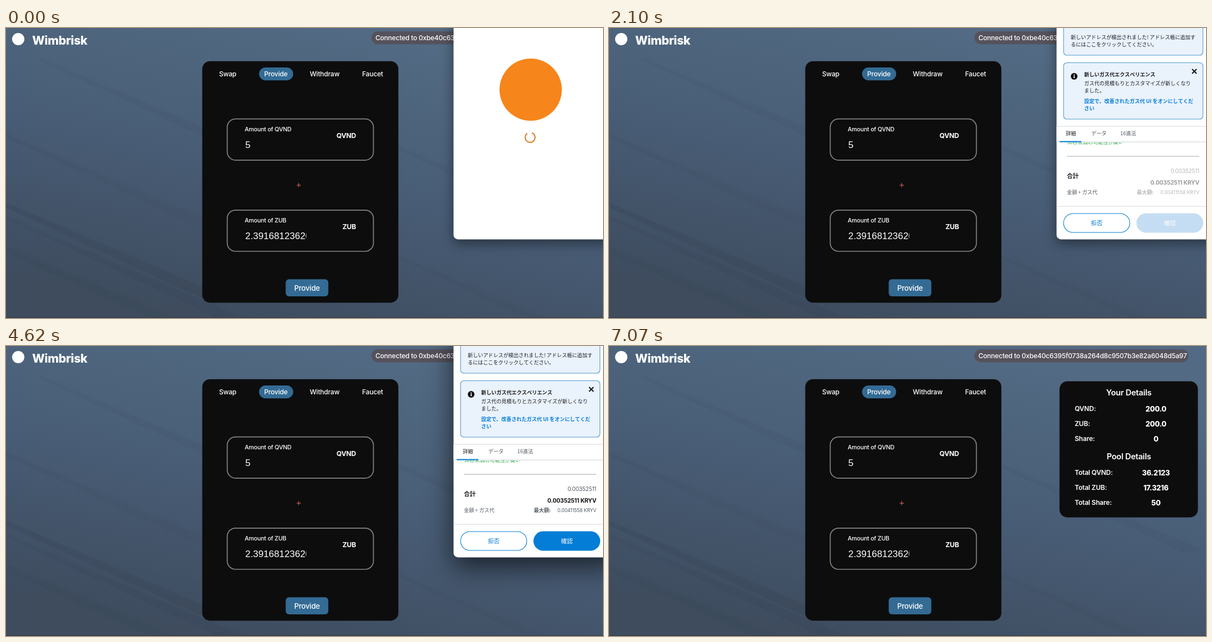
These frames come from a looping animation (1073x522 px, 8 s). An HTML page with a canvas:

```html
<!DOCTYPE html>
<html lang="ja">
<head>
<meta charset="utf-8">
<title>Provide</title>
<style>
html, body { margin: 0; width: 100%; height: 100%; overflow: hidden; background: #485c75; }
canvas { position: absolute; left: 0; top: 0; }
</style>
</head>
<body>
<canvas id="page" width="1073" height="522"></canvas>
<canvas id="popup" width="1073" height="522"></canvas>
<script>
const W = 1073, H = 522, LOOP = 8000;
const SANS = 'Inter, sans-serif';
const CJK = '"Noto Sans CJK JP", "Noto Sans CJK", sans-serif';
const ARIAL = '"Liberation Sans", Arial, sans-serif';
const BLUE = '#037dd6', GREY = '#535a61', LINE = '#d6d9dc', INK = '#1b1d1f';
const TOKEN_A = 'QVND', TOKEN_B = 'ZUB', COIN = 'KRYV';
const popup = document.getElementById('popup');
let g = document.getElementById('page').getContext('2d');

const clamp = (v, a = 0, b = 1) => Math.min(b, Math.max(a, v));
const ramp = (t, from, to) => clamp((t - from) / (to - from));
const smooth = p => p * p * (3 - 2 * p);

// y is the optical centre of the capitals
function text(str, x, y, size, { color = '#fff', weight = 400, align = 'left', font = SANS, alpha = 1 } = {}) {
  g.font = `${weight} ${size}px ${font}`;
  g.letterSpacing = font === SANS ? `${-size * 0.018}px` : '0px';
  g.textAlign = align;
  g.fillStyle = color;
  g.globalAlpha = alpha;
  g.fillText(str, x, y + size * (font === CJK ? 0.38 : 0.36));
  g.globalAlpha = 1;
}
const label = (str, x, y, size, opts = {}) => text(str, x, y, size, { weight: 500, ...opts });
const jp = (str, x, y, size, opts = {}) => text(str, x, y, size, { color: INK, ...opts, font: CJK });

function box(x, y, w, h, r, fill, stroke, lw = 1) {
  g.beginPath();
  g.roundRect(x, y, w, h, r);
  if (fill) { g.fillStyle = fill; g.fill(); }
  if (stroke) { g.strokeStyle = stroke; g.lineWidth = lw; g.stroke(); }
}
function rect(x, y, w, h, color) {
  g.fillStyle = color;
  g.fillRect(x, y, w, h);
}
function line(x1, y1, x2, y2, color, lw) {
  g.beginPath();
  g.moveTo(x1, y1);
  g.lineTo(x2, y2);
  g.strokeStyle = color;
  g.lineWidth = lw;
  g.stroke();
}
function disc(x, y, r, color) {
  g.beginPath();
  g.arc(x, y, r, 0, Math.PI * 2);
  g.fillStyle = color;
  g.fill();
}
function info(x, y, r, color) {
  disc(x, y, r, color);
  rect(x - r * 0.15, y - r * 0.1, r * 0.32, r * 0.62, '#fff');
  rect(x - r * 0.15, y - r * 0.55, r * 0.32, r * 0.3, '#fff');
}

// ---- page behind the popup ----
function streak(x, y, len, thick, alpha) {
  const drop = len * 0.43;
  g.beginPath();
  g.moveTo(x, y);
  g.lineTo(x + len, y + drop);
  g.lineTo(x + len * 0.9, y + drop + thick * 0.4);
  g.lineTo(x, y + thick);
  g.fillStyle = `rgba(38,48,62,${alpha})`;
  g.fill();
}
function backdrop() {
  const sky = g.createLinearGradient(590, 0, 470, 545);
  sky.addColorStop(0, '#526a83');
  sky.addColorStop(0.5, '#485c75');
  sky.addColorStop(1, '#3e4c5e');
  rect(0, 0, W, H, sky);
  streak(0, 314, 400, 9, 0.13);
  streak(0, 338, 420, 6, 0.08);
  streak(0, 392, 300, 14, 0.06);
  streak(60, 52, 330, 7, 0.05);
  streak(0, 190, 380, 8, 0.05);
  streak(690, 205, 380, 8, 0.05);
  streak(690, 402, 280, 7, 0.06);
  rect(0, H - 1, W, 1, 'rgba(25,30,40,.5)');
}
function amount(y, token, value) {
  box(397.6, y, 262.8, 74.2, 15, null, '#858585', 1.7);
  label('Amount of ' + token, 429, y + 18.2, 10.6);
  text(token, 629, y + 30, 12.1, { weight: 700, align: 'right' });
  g.save();
  g.beginPath();
  g.rect(425, y, 114.5, 74);
  g.clip();
  text(value, 430, y + 46.3, 16.9, { font: ARIAL });
  g.restore();
}
function details() {
  box(809.7, 63.6, 248.7, 244.8, 14, '#0d0d0e');
  const title = (s, y) => text(s, 934.3, y, 14.6, { weight: 600, align: 'center' });
  const row = (name, value, y) => {
    text(name, 837, y, 12, { weight: 600 });
    text(value, 983, y, 12.9, { weight: 800, align: 'center' });
  };
  title('Your Details', 83.5);
  row(TOKEN_A + ':', '200.0', 113);
  row(TOKEN_B + ':', '200.0', 140);
  row('Share:', '0', 167);
  title('Pool Details', 198.5);
  row(`Total ${TOKEN_A}:`, '36.2123', 228);
  row(`Total ${TOKEN_B}:`, '17.3216', 255);
  row('Total Share:', '50', 282);
}
function drawPage() {
  backdrop();
  disc(22, 20, 11, '#fff');
  text('Wimbrisk', 47, 22, 21.4, { weight: 800 });
  box(656.7, 6, 384.6, 23.2, 11.6, '#55525c');
  label('Connected to 0xbe40c6395f0738a264d8c9507b3e82a6048d5a97', 664, 17.5, 12);

  box(352.7, 59.7, 352.5, 434.7, 14, '#0d0d0e');
  box(454.8, 71, 61.4, 23.2, 11.6, '#336b94');
  label('Swap', 383, 83, 12);
  label('Provide', 464, 83, 12);
  label('Withdraw', 546, 83, 12);
  label('Faucet', 640, 83, 12);
  amount(163.7, TOKEN_A, '5');
  line(522.5, 283, 530, 283, '#c46652', 1.2);
  line(526, 279, 526, 286.5, '#c46652', 1.2);
  amount(327.8, TOKEN_B, '2.39168123620');
  box(502.7, 452.3, 76.6, 30.8, 6, '#336b94');
  label('Provide', 541, 468, 13.2, { align: 'center' });
  details();
}

// ---- wallet popup ----
function loading() {
  disc(943, 111, 56, '#f6851b');
  g.beginPath();
  g.arc(942, 197, 8.9, -1.2, 4.1);
  g.strokeStyle = '#d9822b';
  g.lineWidth = 2.2;
  g.stroke();
}
function banners() {
  box(817, -12, 250.5, 61, 6, '#eaf2fc', '#4c9bd0', 1.1);
  jp('新しいアドレスが検出されました! アドレス帳に追加す', 830, 16.5, 9.15);
  jp('るにはここをクリックしてください。', 830, 30, 9.15);
  box(817, 62.5, 250.5, 101.5, 6, '#eaf2fc', '#4c9bd0', 1.1);
  info(836, 87, 6, '#101214');
  line(1048, 74, 1056, 82, '#101214', 2);
  line(1056, 74, 1048, 82, '#101214', 2);
  jp('新しいガス代エクスペリエンス', 854, 83.5, 9.15, { weight: 700 });
  jp('ガス代の見積もりとカスタマイズが新しくなり', 854, 100, 9.15);
  jp('ました。', 854, 112.5, 9.15);
  const link = { weight: 700, color: BLUE };
  jp('設定で、改善されたガス代 UI をオンにしてくだ', 854, 131.5, 9.15, link);
  jp('さい', 854, 144.5, 9.15, link);
}
function avatar(x, y) {
  const slice = (a, b, color) => {
    g.beginPath();
    g.moveTo(x, y);
    g.arc(x, y, 14, a * Math.PI, b * Math.PI);
    g.fillStyle = color;
    g.fill();
  };
  disc(x, y, 14, '#f78c0a');
  slice(0.82, 1.02, '#0b7b8d');
  slice(1.02, 1.5, '#f2ab1c');
  slice(1.5, 1.86, '#0b7b8d');
}
function origin(dy) {
  rect(804, 177 + dy, 269, 103, '#f2f4f6');
  text('https://brindlewo-qtm-viewer.zu.example', 823, 197 + dy, 10.5, { color: INK });
  box(823, 215 + dy, 225, 19, 3, null, '#bbc0c5', 1);
  text('0x627...3BcD', 829, 224.5 + dy, 10, { color: BLUE });
  text(':', 892, 224.5 + dy, 10, { color: GREY });
  jp('コントラクトインタラクション', 898, 224.5 + dy, 9.15, { color: GREY });
  info(1034, 224.5 + dy, 4.7, '#6a737d');
  avatar(836.5, 254 + dy);
}
function tabs(y) {
  rect(804, y, 269, 29, '#fff');
  rect(804, y + 27.5, 269, 1.2, LINE);
  rect(810, y + 26.5, 39, 2, BLUE);
  jp('詳細', 821, y + 13, 9.15, { weight: 500 });
  jp('データ', 867, y + 13, 9.15, { color: GREY });
  jp('16進法', 919, y + 13, 9.15, { color: GREY });
}
function confirmFill(t) {
  if (t < 3850 || t >= 6230) return '#c5ddf2';
  if (t >= 5880) return '#0260a4';
  return t >= 4410 && t < 4620 ? '#1787da' : BLUE;
}
function fees(dy, t) {
  const wave = Math.sin(Math.PI * ramp(t, 1540, 3780)) ** 2;
  const alpha = t < 350 ? 0 : 1 - Math.min(0.95, 1.15 * wave);
  const soft = { color: GREY, align: 'right', alpha };
  const bold = { color: '#101214', weight: 700, align: 'right', alpha };

  jp('編集', 1061, 332 + dy, 9.15, { color: BLUE, weight: 500, align: 'right' });
  jp('ガス代見積もり', 823, 366 + dy, 10.6, { weight: 700 });
  info(905.5, 366 + dy, 4.7, '#6a737d');
  text('0.00352511', 1061, 358 + dy, 10, soft);
  text('0.003525 ' + COIN, 1061, 379 + dy, 10.4, bold);

  const y = 190 + dy;
  jp('30秒未満の可能性が高い', 823, 206 + y, 9.15, { color: '#28a745' });
  rect(823, 230.3 + y, 238, 1.4, '#bbc0c5');
  jp('合計', 823, 266 + y, 10.6, { weight: 700 });
  text('0.00352511', 1061, 257 + y, 10, soft);
  text('0.00352511 ' + COIN, 1061, 278 + y, 10.4, bold);
  jp('金額 + ガス代', 823, 295.5 + y, 9.15, { color: GREY });
  jp('最大額:', 979, 295.5 + y, 9.15, { ...bold, color: GREY });
  text('0.00411558 ' + COIN, 1061, 295.5 + y, 8.7, soft);

  rect(804, 320.5 + y, 269, 1, LINE);
  box(817, 334 + y, 119, 34, 17, '#fff', BLUE, 1.1);
  jp('拒否', 876.5, 350.5 + y, 10.6, { color: BLUE, align: 'center' });
  box(948, 333.5 + y, 120, 35, 17.5, confirmFill(t));
  jp('確認', 1008, 350.5 + y, 10.6, { color: '#fff', weight: 500, align: 'center' });
}
function spinner(t) {
  const head = 6 + Math.floor((Math.min(t, 6720) - 6720) / 70);
  for (let i = 0; i < 12; i++) {
    const age = ((head - i) % 12 + 12) % 12;
    const a = i * Math.PI / 6, c = Math.sin(a), s = -Math.cos(a);
    const color = age > 7 ? `rgba(215,212,207,${1.1 - age * 0.05})`
                          : `rgba(228,130,35,${1 - age * 0.1})`;
    line(942.5 + c * 10, 153.5 + s * 10, 942.5 + c * 23, 153.5 + s * 23, color, 4);
  }
}
function windowShape() {
  g.beginPath();
  g.roundRect(804.4, -30, 300, 410.4, 8);
}
function drawPopup(t) {
  g.clearRect(0, 0, W, H);
  if (t >= 7070) return;
  popup.style.opacity = t >= 7000 ? 0.5 : 1;

  const focused = t >= 4270;
  g.save();
  g.shadowColor = focused ? 'rgba(0,0,0,.65)' : 'rgba(0,0,0,.45)';
  g.shadowBlur = focused ? 48 : 22;
  g.shadowOffsetY = focused ? 16 : 7;
  windowShape();
  g.fillStyle = '#fff';
  g.fill();
  g.restore();

  g.save();
  windowShape();
  g.clip();
  if (t < 70) {
    loading();
  } else {
    const scroll = 190 * smooth(ramp(t, 1540, 2080));
    banners();
    g.save();
    g.beginPath();
    g.rect(804, 177, 269, 204);
    g.clip();
    origin(-scroll);
    fees(-scroll, t);
    tabs(Math.max(177, 280 - scroll));
    g.restore();
    rect(804, 176.5, 269, 1, LINE);

    const fresh = 0.8 * (1 - ramp(t, 70, 210));
    if (fresh > 0) rect(804, 0, 269, 381, `rgba(255,255,255,${fresh})`);
    const veil = 0.75 * ramp(t, 6160, 6440);
    if (veil > 0) rect(804, 0, 269, 381, `rgba(246,248,250,${veil})`);
    if (t >= 6230) spinner(t);
  }
  g.restore();
}

drawPage();
g = popup.getContext('2d');
const start = performance.now();
function tick() {
  drawPopup((performance.now() - start) % LOOP);
  requestAnimationFrame(tick);
}
tick();
</script>
</body>
</html>
```
